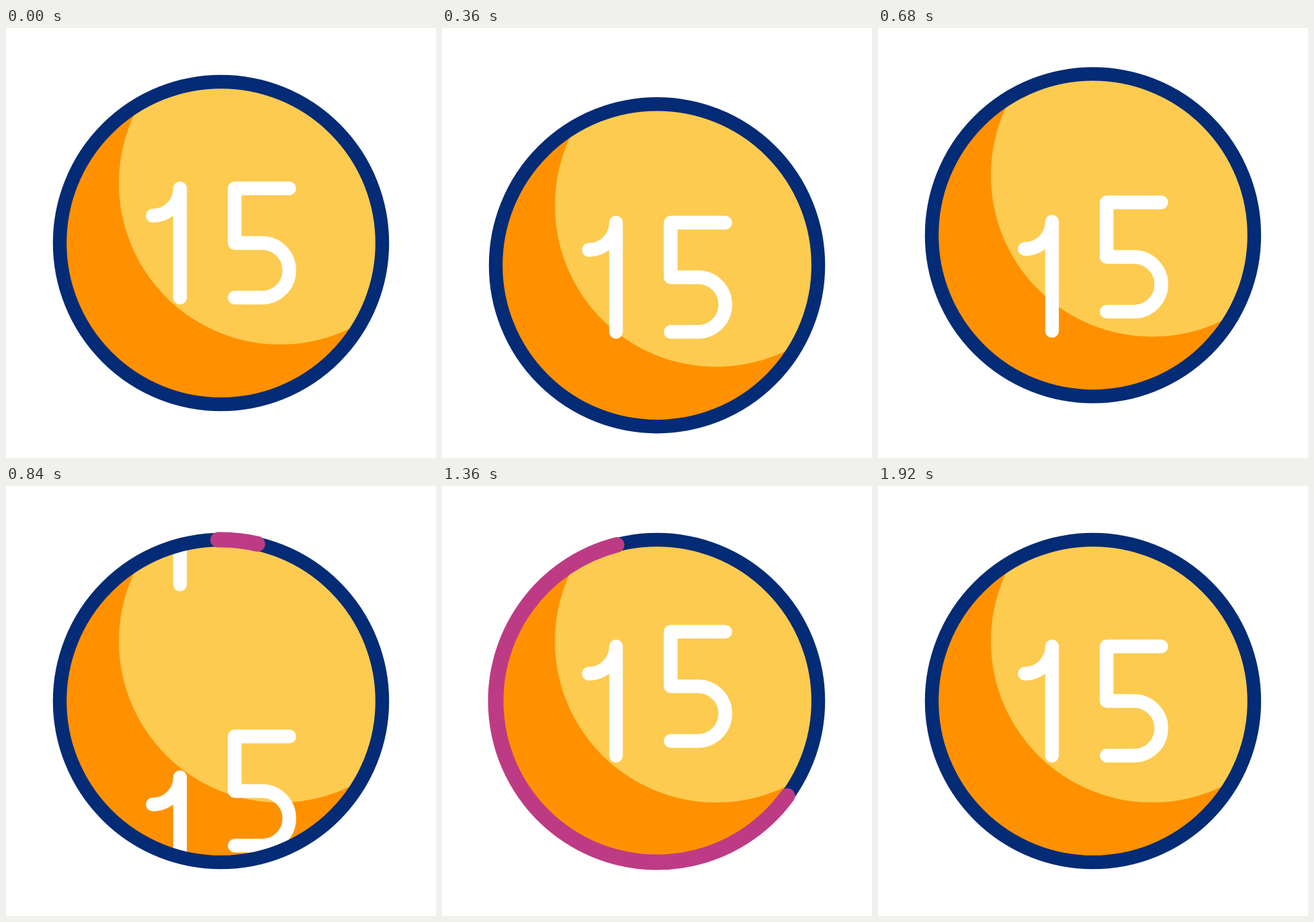
An HTML page with a canvas for the animation above (2000 ms loop, 640 by 640 pixels).

```html
<!DOCTYPE html>
<html lang="en">
<head>
<meta charset="utf-8">
<title>Ball 15</title>
<style>
  html, body { margin: 0; width: 100%; height: 100%; overflow: hidden; background: #fff; }
  canvas { display: block; width: 100vmin; height: 100vmin; }
</style>
</head>
<body>
<canvas id="stage" width="640" height="640"></canvas>
<script>
const ctx = document.getElementById('stage').getContext('2d');
const TAU = Math.PI * 2;
const LOOP = 2000;
const NAVY = '#032b76', ORANGE = '#ff9100', YELLOW = '#fdcb50', PURPLE = '#bd3b85';

const one = new Path2D('M218.4 279.3A40.6 40.6 0 0 0 259 238.7V401.3');
const five = new Path2D('M421.6 238.7H340.3V320H381A40.6 40.6 0 0 1 381 401.3H340.3');

// Progress from a to b, clamped to 0..1
const span = (t, a, b) => Math.min(1, Math.max(0, (t - a) / (b - a)));
const ease = u => u * u * (3 - 2 * u);

// Eased track through [time, value] keys
function track(t, keys) {
  let value = keys[0][1];
  for (let i = 1; i < keys.length; i++) {
    const [t0, v0] = keys[i - 1], [t1, v1] = keys[i];
    if (t >= t0) value = v0 + (v1 - v0) * ease(span(t, t0, t1));
  }
  return value;
}

// Quick start, soft landing: cubic Bezier (.17, 0, .626, 1)
function rollEase(u) {
  let lo = 0, hi = 1;
  for (let i = 0; i < 24; i++) {
    const s = (lo + hi) / 2, r = 1 - s;
    if (3 * r * r * s * .17 + 3 * r * s * s * .626 + s ** 3 < u) lo = s; else hi = s;
  }
  return ease(lo);
}

const ballY = t => track(t, [[120, 0], [360, 33.2], [566, -32], [760, 0]]);
const swing = t => track(t, [[120, 0], [360, 51], [520, -51]]);

// A digit rolls down and out while its copy follows from above
function drawDigit(path, t, end, gap) {
  const y = swing(t) + (gap + 51) * rollEase(span(t, 520, end));
  for (const dy of [y, y - gap]) {
    ctx.save();
    ctx.translate(0, dy);
    ctx.stroke(path);
    ctx.restore();
  }
}

function disc(x, y, r, color) {
  ctx.beginPath();
  ctx.arc(x, y, r, 0, TAU);
  ctx.fillStyle = color;
  ctx.fill();
}

function ring(y, from, to, width, color) {
  ctx.beginPath();
  ctx.arc(320, y, 240, from, to);
  ctx.lineWidth = width;
  ctx.strokeStyle = color;
  ctx.stroke();
}

function draw(t) {
  const cy = 320 + ballY(t);
  ctx.clearRect(0, 0, 640, 640);
  ctx.lineCap = ctx.lineJoin = 'round';

  ctx.save();
  ctx.beginPath();
  ctx.arc(320, cy, 238, 0, TAU);
  ctx.clip();
  disc(320, cy, 240, ORANGE);
  disc(408, cy - 89, 240, YELLOW);
  ctx.strokeStyle = '#fff';
  ctx.lineWidth = 20.4;
  drawDigit(one, t, 1290, 449.5);
  drawDigit(five, t, 1502, 456);
  ctx.restore();

  ring(cy, 0, TAU, 20.4, NAVY);

  const head = ease(span(t, 760, 1440));
  const tail = ease(span(t, 1040, 1841));
  if (head > tail) {
    const top = -TAU / 4 - .018;
    ring(cy, top + TAU * tail, top + TAU * head, 23, PURPLE);
  }
}

function tick() {
  draw(performance.now() % LOOP);
  requestAnimationFrame(tick);
}
tick();
</script>
</body>
</html>
```
